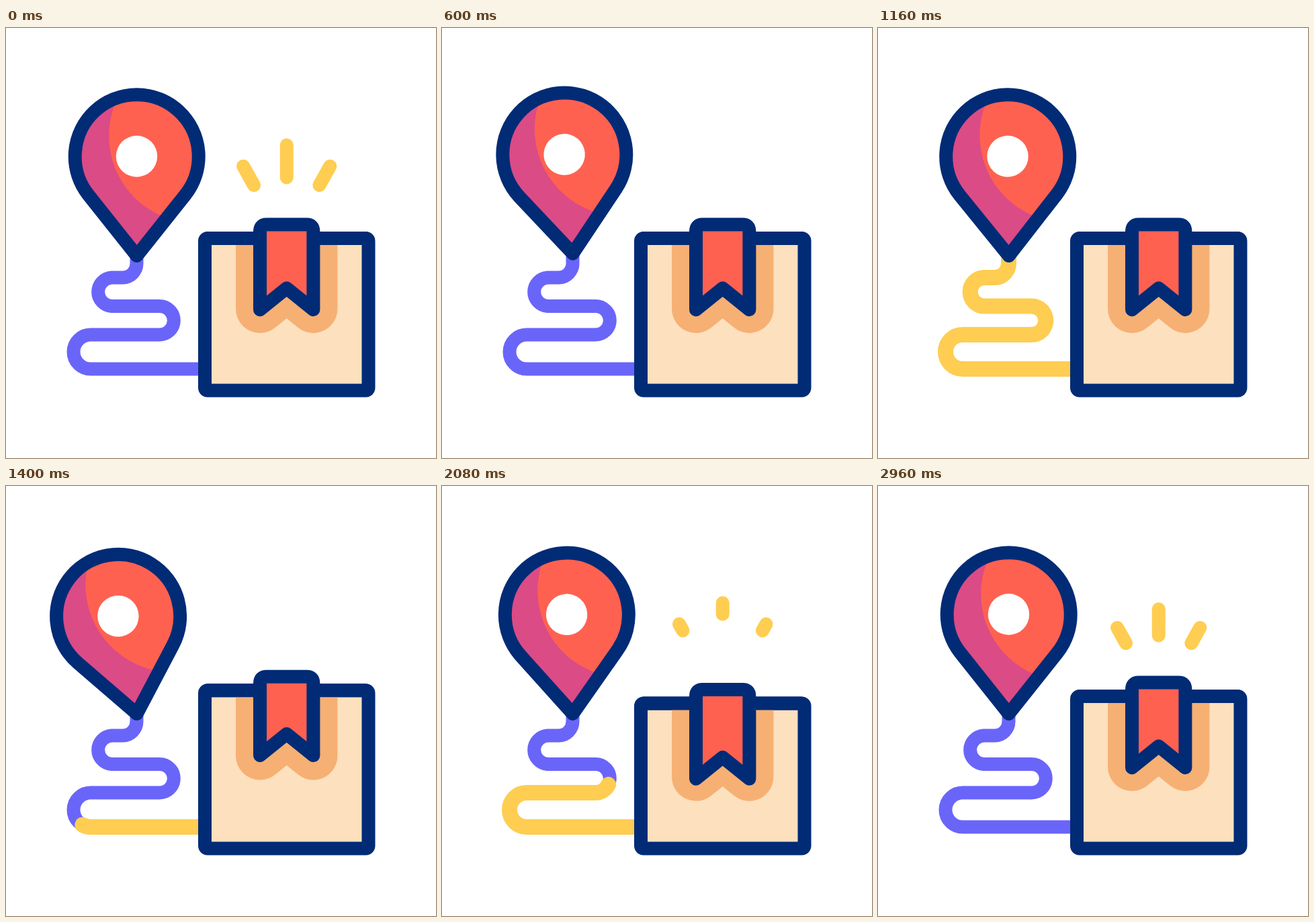
Animation, 640 px wide and 640 px high, one loop 3 s. Source, as an HTML page:

```html
<!DOCTYPE html>
<html>
<head>
<meta charset="utf-8">
<style>
html, body { margin: 0; height: 100%; overflow: hidden; background: #fff }
svg { display: block; width: 100%; height: 100%; fill: none; stroke-width: 20; stroke-linecap: round; stroke-linejoin: round }
.ink { stroke: #022b76 }
.gold { stroke: #fecd51 }
.flow { stroke-width: 23 }
#shade { stroke-width: 72; stroke-linecap: butt }
</style>
</head>
<body>
<svg viewBox="0 0 640 640">
  <path id="road" stroke="#6a65f9" d="M194.5 340V350A21 21 0 0 1 173.5 371.5H157A21.3 21.3 0 0 0 157 414H228.5A21.2 21.2 0 0 1 228.5 456.5H126A25.5 25.5 0 0 0 126 507.5H300"/>
  <path class="gold flow" pathLength="1"/>
  <path class="gold flow" pathLength="1"/>
  <path class="gold ray" pathLength="1" d="M417.7 222.5V174"/>
  <path class="gold ray" pathLength="1" d="M369 234L353 205.5"/>
  <path class="gold ray" pathLength="1" d="M466.4 234L482.4 205.5"/>
  <rect id="box" class="ink" x="296" width="243.5" rx="4" fill="#fde0be"/>
  <path id="shade" fill="#f6b074" stroke="#f6b074"/>
  <path id="lid" class="ink"/>
  <path id="ribbon" class="ink" fill="#ff6150"/>
  <g id="pin">
    <path fill="#ff6150" d="M194.7 339L122.7 248.5A92 92 0 1 1 266.7 248.5Z"/>
    <path fill="#db4b86" d="M194.7 339L122.7 248.5A92 92 0 0 1 164 105L162.5 112A130 130 0 0 0 231 279.5L236 287Z"/>
    <path class="ink" d="M194.7 339L122.7 248.5A92 92 0 1 1 266.7 248.5Z"/>
    <circle cx="194.5" cy="191" r="30.7" fill="#fff"/>
  </g>
</svg>
<script>
const LOOP = 3000, FLOOR = 539.5;
const $ = id => document.getElementById(id);
const put = (id, name, value) => $(id).setAttribute(name, value);
const flows = document.querySelectorAll('.flow');
const rays = document.querySelectorAll('.ray');
for (const f of flows) f.setAttribute('d', $('road').getAttribute('d'));

// Eased 0 to 1, beginning at start
function ramp(t, start, length) {
  const u = Math.min(1, Math.max(0, (t - start) / length));
  return u * u * (3 - 2 * u);
}

// Cosine wave around mid, cut off at its zero crossings
function swing(t, mid, half, lobes) {
  const x = (t - mid) / half;
  return Math.abs(x) < lobes + 0.5 ? Math.cos(Math.PI * x) : 0;
}

// Show only the part of a path between fractions a and b
function trim(el, a, b) {
  el.style.visibility = b - a > 0.001 ? 'visible' : 'hidden';
  el.style.strokeDasharray = `${Math.max(0, b - a)} 9`;
  el.style.strokeDashoffset = -a;
}

function drawPin(t) {
  const hop = t < 680 ? -26 * Math.sin(Math.PI * t / 680) ** 2 : 0;
  const fade = Math.exp(-Math.abs(t - 1365) / 1150);
  const tilt = -11.5 * fade * swing(t, 1365, 424, 2);
  put('pin', 'transform', `translate(0 ${hop}) rotate(${tilt} 194.7 339)`);
}

function drawFlows(t) {
  flows.forEach((f, i) => {
    const start = 680 + i * 765;
    trim(f, ramp(t, start + 467, 400), ramp(t, start, 480));
  });
}

function drawRays(t) {
  // The last burst runs across the seam of the loop
  const now = t > 2800 ? t - LOOP : t;
  const start = now < 500 ? -165 : now < 1500 ? 800 : 1810;
  const hold = start === 800 ? 90 : 165;
  for (const r of rays) trim(r, ramp(now, start + hold, 175), ramp(now, start, 175));
}

function drawBox(t) {
  const squash = 12 * swing(t, 2000, 484, 1);
  const drop = 1.85 * squash - 0.025 * squash ** 2;
  const top = 313 + squash;
  const ends = y => `V${y}L417.7 ${y - 32}L378 ${y}`;
  put('box', 'y', top);
  put('box', 'height', FLOOR - top);
  put('shade', 'd', `M378 ${top}V${418 + drop * 0.9}l39.7 -32l39.7 32V${top}`);
  put('lid', 'd', `M300 ${top}H535`);
  put('ribbon', 'd', `M378 ${top - 10.5}q0 -10 10 -10H447.4q10 0 10 10${ends(419.3 + drop)}Z`);
}

function tick() {
  const t = performance.now() % LOOP;
  drawPin(t);
  drawFlows(t);
  drawRays(t);
  drawBox(t);
  requestAnimationFrame(tick);
}
tick();
</script>
</body>
</html>
```
